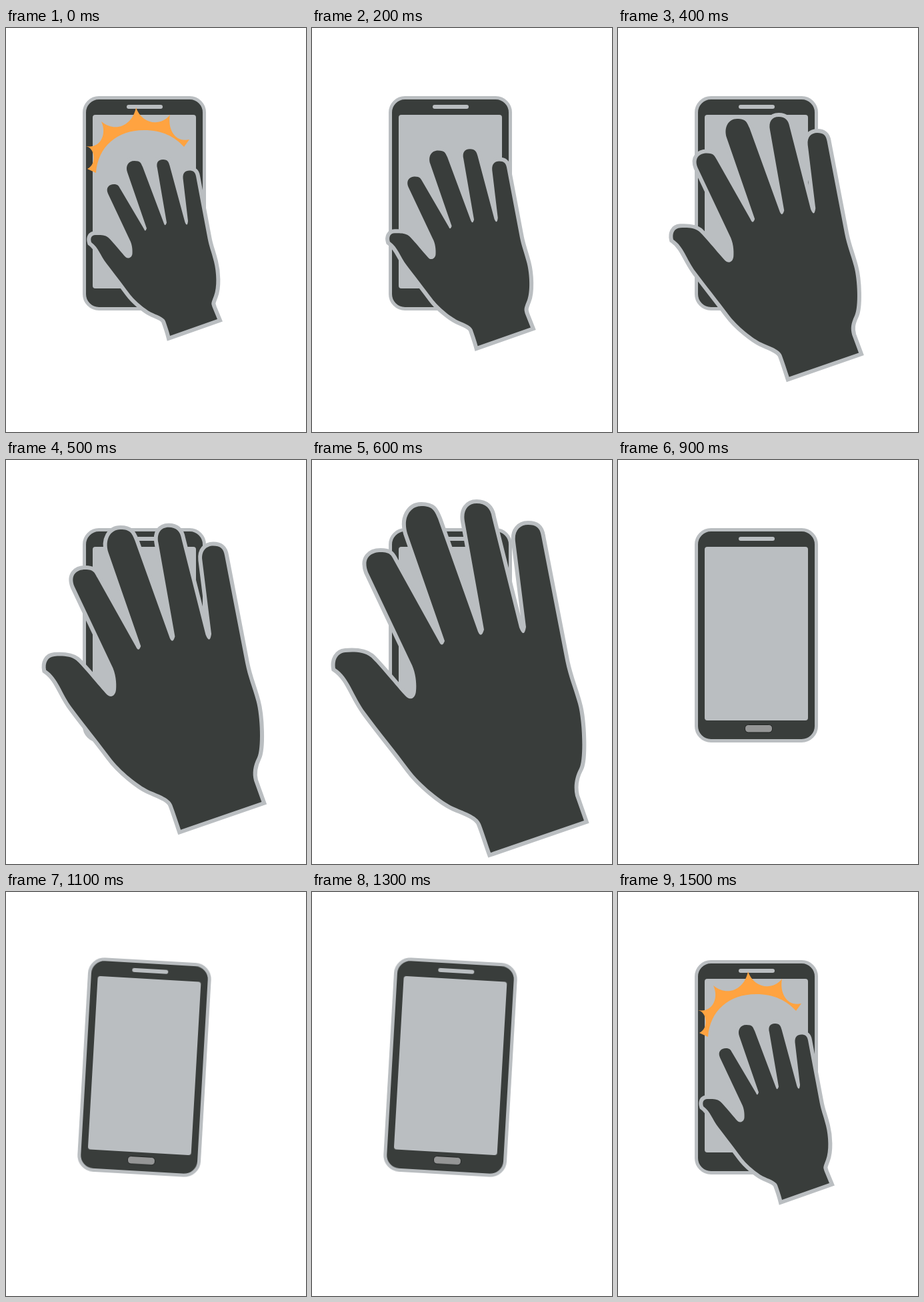
Recreate the animation shown at these times as an HTML page without scripts. Size 450 by 605 pixels, loop 1600 ms.

```html
<!DOCTYPE html>
<html lang="en">
<head>
<meta charset="utf-8">
<title>Hand slapping a ringing phone</title>
<style>
  :root { --dark: #393d3b; --light: #babec1; --loop: 1600ms; }
  html, body { margin: 0; width: 100%; height: 100%; overflow: hidden; background: #fff; }
  svg { display: block; width: 100%; height: 100%; }

  .phone {
    transform-origin: 207.5px 262.5px;
    animation: ring var(--loop) step-end infinite;
  }
  .case { fill: var(--dark); stroke: var(--light); stroke-width: 5; }
  .glass { fill: var(--light); }
  .button { fill: #959696; stroke: #1f2221; }

  .burst { fill: #ffa340; animation: flash var(--loop) step-end infinite; }

  /* The outline is painted first, so only its outer half shows. */
  .hand {
    fill: var(--dark);
    stroke: var(--light);
    stroke-width: 12;
    stroke-miterlimit: 3;
    paint-order: stroke;
    animation: raise var(--loop) infinite, leave var(--loop) step-end infinite;
    animation-timing-function:
      linear(0 0% 12.5%, .12 12.5% 18.75%, .28 18.75% 25%, .485 25% 31.25%,
             .73 31.25% 37.5%, 1 37.5% 43.75%, 0 43.75% 100%),
      step-end;
  }

  @keyframes ring {
    0%, 93.75% { transform: none; }
    68.75%, 81.25% { transform: rotate(3.3deg); }
    75%, 87.5% { transform: rotate(-3.3deg); }
  }
  @keyframes flash {
    0%, 43.75%, 93.75% { visibility: visible; }
    6.25%, 56.25% { visibility: hidden; }
  }
  @keyframes leave {
    0%, 93.75% { visibility: visible; }
    56.25% { visibility: hidden; }
  }
  /* Wrist, thumb, four fingers, then back down the outer edge. */
  @keyframes raise {
    from {
      d: path("M246 461 C244 453 241 445 239 439 S225 429.5 218 426 S194 410 184.5 397 S161 366 151 353 S139 329 128 321 C126 315 128 310 134 310 S148 309.5 153 313.5 S177 341 180 343.5 S189 344 189.5 338 S189 323 185.5 317 L153 248 C149 239 155 234 161.5 234 S169 236.5 171.5 241 L207 301 Q209 306.5 211 300 L182 216 C179 207 183 199 192.5 199 S202 202 205 208 L237 293 Q239 298 241 291.5 L227 210 C225 202 228 197 235.5 197 S244 201 245.5 206 L268.5 291 Q272 299 273 289 L265.5 225 C265 217 269 213.5 275 213.5 S284 216 285 222 L302.5 315 C305 328 308 334 312 350 S317 388 312 401 S308 412 310 419 L317 436 Z");
    }
    to {
      d: path("M268 588 C263 574 258 558 253 545 S226 526 211 519 S163 487 145 462.5 S99 404 80 378 S56 326 35 312 C33 300 38 289 50 288 S78 287 88 295 S136 350 142 355 S155 357 156 346 S156 318 148 303 L84 168 C76 147 88 138 103 138 S119 143 124 152 L190 271 Q195 282 199 271 L143 110 C136 87 147 69 164 69 S184 76 189 88 L249 257 Q254 268 258 254 L229 92 C226 75 234 65 247 65 S268 72 270 86 L311 251 Q318 268 321 250 L305 122 C303 106 312 97 324 97 S342 101 344 114 L380 300 C385 325 392 340 399 365 S408 449 401 462 S392 490 395 503 L408 540 Z");
    }
  }
</style>
</head>
<body>
<svg viewBox="0 0 450 605">
  <g class="phone">
    <rect class="case" x="117.5" y="104.5" width="180" height="316" rx="22"/>
    <rect class="glass" x="130" y="130" width="155" height="260" rx="4"/>
    <rect class="glass" x="181" y="115" width="54" height="6" rx="3"/>
    <rect class="button" x="190.5" y="396.5" width="41" height="11.5" rx="5"/>
  </g>
  <path class="burst" d="M135 217 C138 178 166 153 207 153 C235 153 253 163 267 178 L275 167 C254 172 242 152 246 130 C231 149 203 143 195 119 C190 145 165 158 143 140 C152 160 141 181 120 177 C133 179 137 204 122 211 Z"/>
  <path class="hand"/>
</svg>
</body>
</html>
```
